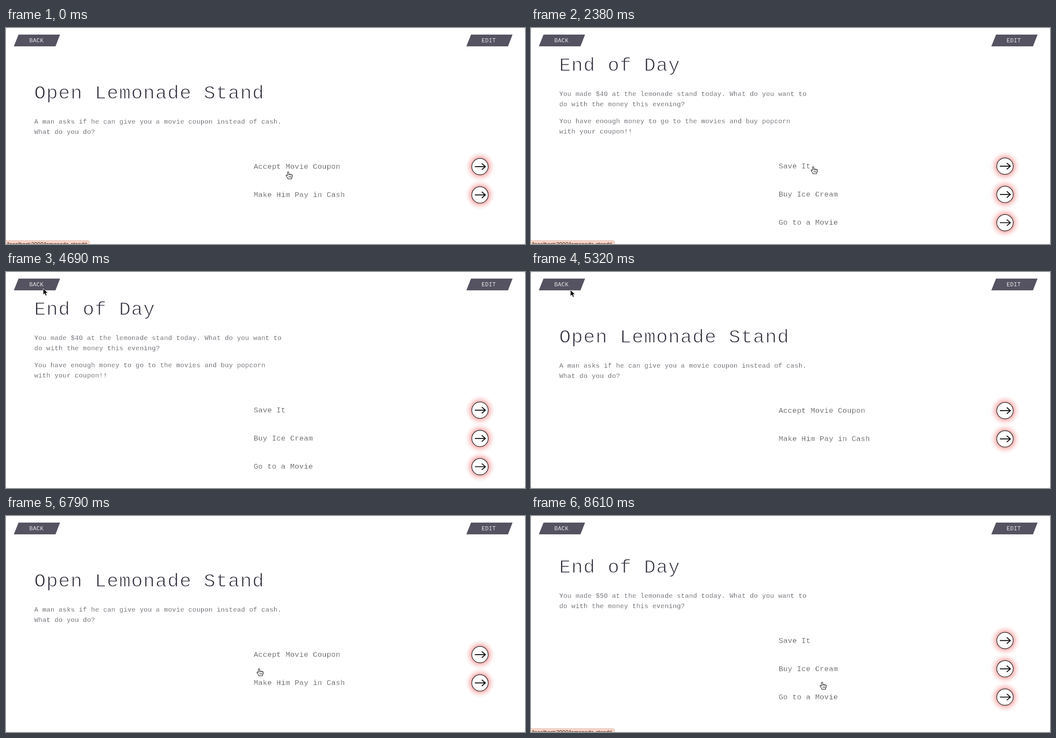
Write an HTML page that moves like this. It is 1159 px wide and 483 px high and loops after 9.1 s.

```html
<!DOCTYPE html>
<html lang="en">
<head>
<meta charset="utf-8">
<title>Lemonade stand story</title>
<style>
  html, body { margin: 0; width: 100%; height: 100%; overflow: hidden; background: #555; }
  svg { display: block; width: 1159px; height: 483px; }
  /* an outline in the background colour thins the letters; spacing keeps the pitch at .6em of the line's nominal size */
  text { font-family: "Courier New", "Liberation Mono", monospace; white-space: pre; stroke: #fff; }
  .title { font-size: 43px; letter-spacing: 1.25px; fill: #302e3c; stroke-width: 1.3px; }
  .body { font-size: 14.4px; letter-spacing: .42px; fill: #47454f; stroke-width: .3px; }
  .label { font-size: 16.2px; letter-spacing: .47px; fill: #3b3a40; stroke-width: .4px; }
  .button { font-size: 12.8px; letter-spacing: .3px; fill: #fff; stroke: #555261; stroke-width: .2px; }
  .status { font: 12.2px "Liberation Sans", Arial, sans-serif; fill: #222; stroke: none; }
</style>
</head>
<body>
<svg viewBox="0 0 1159 483">
  <defs>
    <radialGradient id="glow">
      <stop offset=".54" stop-color="#f25c5c" stop-opacity=".56"/>
      <stop offset=".7" stop-color="#f47a7a" stop-opacity=".36"/>
      <stop offset=".86" stop-color="#f79a9a" stop-opacity=".17"/>
      <stop offset="1" stop-color="#f9b0b0" stop-opacity=".05"/>
    </radialGradient>
    <g id="go">
      <circle r="32.5" fill="url(#glow)"/>
      <circle r="18.3" fill="#fff" stroke="#111" stroke-width="1.2"/>
      <path d="M-11.5 0H12M4-7 12 0 4 7" fill="none" stroke="#000" stroke-width="1.9"/>
    </g>
  </defs>
  <rect width="1159" height="483" rx="2" fill="#fff"/>
  <g id="screens"></g>
  <path d="M28 14.700H120.700L110.500 41H17.500ZM1038.500 14.700H1131.200L1121 41H1028Z" fill="#555261"/>
  <text class="button" x="52" y="32">BACK</text>
  <text class="button" x="1062" y="32">EDIT</text>
  <g id="status">
    <path d="M-1 475.500H183Q186.500 475.500 186.500 479V485H-1Z" fill="#ffd5c4" stroke="#cdb6ac"/>
    <text class="status" x="181" y="488" text-anchor="end">/localhost:3000/lemonade-stand#</text>
  </g>
  <g id="pointer">
    <circle id="ring" r="28" fill="none" stroke="#333" stroke-width="2"/>
    <path id="arrow" d="M0 0V14L3.300 11 5.600 16.300 8.200 15.200 6 10H10.500Z" stroke="#fff" stroke-width=".9"/>
    <g id="hand" fill="#fff" stroke="#111" stroke-width="1.1" stroke-linejoin="round">
      <path d="M-1.500 8.500V1.500Q-1.500 0 0 0T1.500 1.500V6Q3.800 4.600 4.500 6Q6.600 5 7.300 6.600Q9.500 6 9.500 8.200V11L7.800 14V16H-.5V14.500L-4.300 9.500Q-5 7.500-3.200 7.400Z"/>
      <path d="M2 9.500V13M4.300 9.500V13M6.600 9.500V13M1.500 5.500V8M4.500 6V8M7.300 6.600V8" stroke-width=".9"/>
    </g>
  </g>
</svg>
<script>
const LOOP = 9100, STEP = 70;
const $ = id => document.getElementById(id);

const choices = ["Save It", "Buy Ice Cream", "Go to a Movie"];
const earned = sum => [`You made $${sum} at the lemonade stand today. What do you want to`,
  "do with the money this evening?"];
const stand = {
  title: "Open Lemonade Stand", top: 158, first: 310,
  lines: ["A man asks if he can give you a movie coupon instead of cash.", "What do you do?"],
  options: ["Accept Movie Coupon", "Make Him Pay in Cash"]
};
const couponDay = {
  title: "End of Day", top: 95.5, first: 309, options: choices,
  lines: [...earned(40), "You have enough money to go to the movies and buy popcorn", "with your coupon!!"]
};
const cashDay = { title: "End of Day", top: 126.5, first: 278.5, options: choices, lines: earned(50) };

const text = (kind, x, y, s) => `<text class="${kind}" x="${x}" y="${y}">${s}</text>`;

function build({ title, top, first, lines, options }) {
  const group = document.createElementNS("http://www.w3.org/2000/svg", "g");
  // every second line closes a paragraph
  const lineY = i => top + 56 + i * 23 + (i >> 1) * 15.5;
  group.innerHTML = text("title", 63, top, title)
    + lines.map((s, i) => text("body", 63.2, lineY(i), s)).join("")
    + options.map((s, i) => {
        const y = first + i * 63.2;
        return text("label", 553.2, y + 5, s) + `<use href="#go" x="1058.5" y="${y}"/>`;
      }).join("");
  return $("screens").appendChild(group);
}
const screens = [stand, couponDay, cashDay].map(build);

// pointer tip: time, x, y
const path = [
  [0, 630, 321.5], [210, 630, 310], [3360, 630, 310], [3850, 340, 194], [4340, 100, 48],
  [4690, 83, 37], [4900, 88, 40], [5460, 88, 40], [5740, 105, 49.5], [6440, 410, 300],
  [6790, 565, 341.5], [7140, 650, 371.5], [LOOP, 650, 371.5]
];
const clicks = [1330, 5180, 7700];

function tip(t) {
  const i = path.findIndex(p => p[0] > t);
  const [t0, x0, y0] = path[i - 1], [t1, x1, y1] = path[i];
  const k = (t - t0) / (t1 - t0);
  return [x0 + (x1 - x0) * k, y0 + (y1 - y0) * k];
}

const clamp = v => Math.max(0, Math.min(1, v));
const show = (el, on) => { el.style.display = on ? "" : "none"; };

function draw(t) {
  const current = t < 1680 || t >= 5320 && t < 7910 ? 0 : t < 5320 ? 1 : 2;
  screens.forEach((el, i) => show(el, i === current));
  $("status").style.opacity = t < 6000 ? clamp((4130 - t) / 210) : clamp((t - 7280) / 140);

  const [x, y] = tip(t), overOption = x > 545 && y > 275;
  $("pointer").setAttribute("transform", `translate(${x} ${y})`);
  show($("hand"), overOption);
  show($("arrow"), !overOption);
  show($("ring"), clicks.some(c => t >= c && t < c + STEP));
}

const start = performance.now();
function tick() {
  const t = (performance.now() - start) % LOOP;
  draw(Math.floor(t / STEP) * STEP);
  requestAnimationFrame(tick);
}
tick();
</script>
</body>
</html>
```
